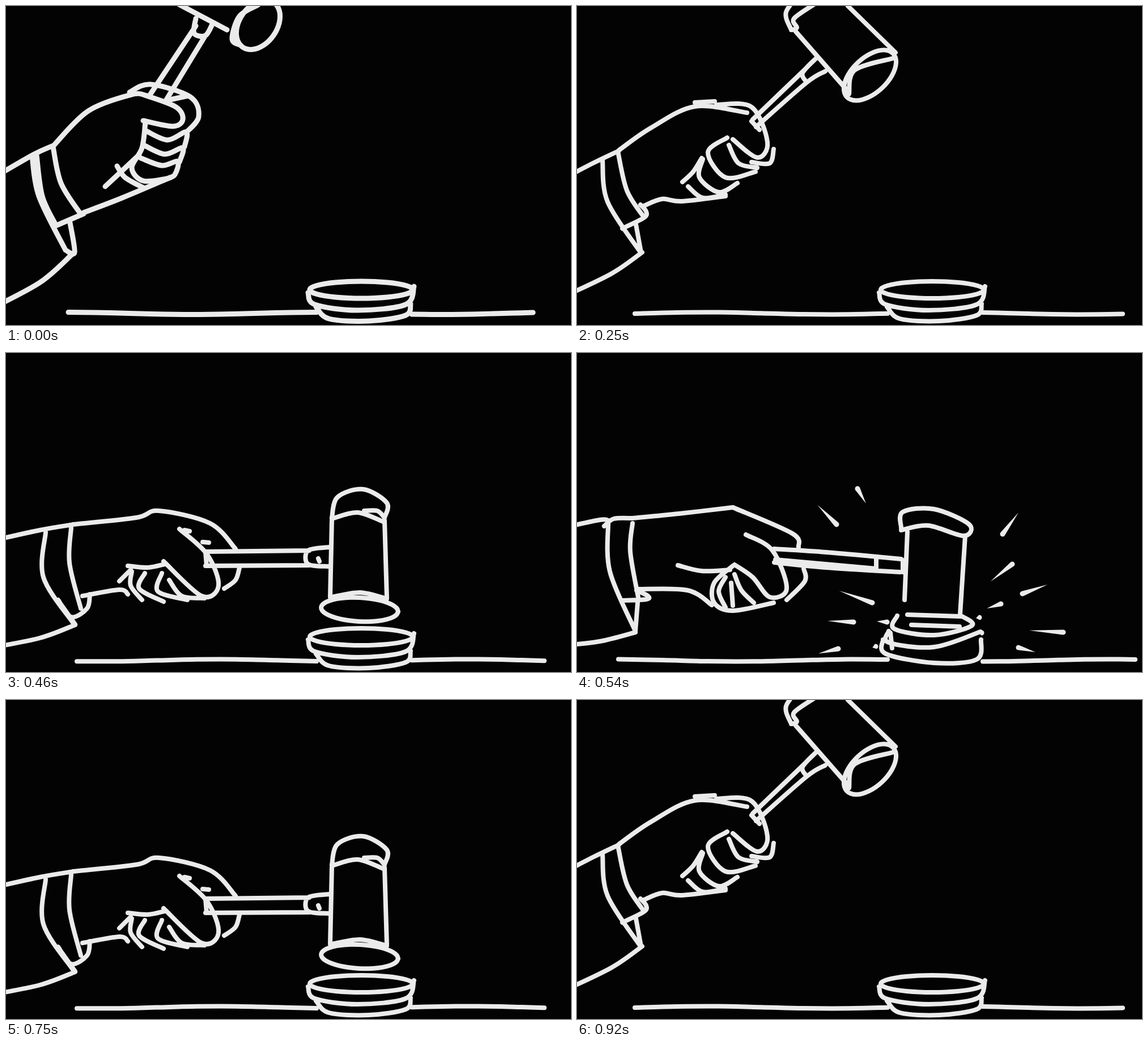
Write an HTML page with a canvas that moves like this. It is 997x562 px and loops after 0.97 s.

```html
<!DOCTYPE html>
<html>
<head>
<meta charset="utf-8">
<title>Gavel</title>
<style>
html, body { margin: 0; width: 100%; height: 100%; overflow: hidden; background: #030303; }
canvas { display: block; }
</style>
</head>
<body>
<canvas id="stage" width="997" height="562"></canvas>
<script>
const ctx = document.getElementById('stage').getContext('2d');
const LOOP = 970, PAPER = '#030303', INK = '#ebebeb', IMPACT = [632, 480];

// Strokes are "x y x y ..." split by "/"; "o" is an ellipse: centre, radii, turn in degrees.
const idleBlock = 'o 627 500 91 15 0/533 505 545 526 620 536 705 526 720 494/547 530 570 551 640 555 705 545 714 525';

// anchors: cuff and ferrule; ground: both ends of the table line.
const raised = {
  anchors: [100, 320, 343, 45], pen: 9, ground: [110, 930], block: idleBlock,
  arm: `-30 307 48 262 83 246/46 264 58 335 105 430/54 263 64 335 88 386/83 248 97 312 132 367/88 387 137 366
    /113 382 121 434 105 430/117 437 60 487 -30 535/83 247 145 185 222 156 248 158/137 364 205 338 290 302`,
  fist: `248 158 300 178 312 200 294 212 242 202/218 152 255 138 325 160 340 195 318 223/285 166 322 158
    /246 204 240 250 222 285 242 308 285 304/247 220 285 236 318 222 315 248/243 245 280 261 312 250 306 275
    /238 268 275 281 303 274 298 297 285 304/175 318 203 292 235 262/196 282 210 302 242 320`,
  gavel: `253 158 335 35/283 165 350 55/335 22 332 48 352 52 365 30/305 -3 390 42/o 445 33 48 33 -55/414 69 399 58 412 18 445 -2`
};
const falling = {
  anchors: [95, 325, 410, 115], pen: 8, ground: [102, 963], block: idleBlock,
  arm: `-30 307 30 276 74 255/45 272 54 345 112 434/72 256 88 325 118 372/80 392 118 373 122 362 112 350/104 385 113 434
    /115 434 60 472 -30 515/74 254 130 215 208 177 300 188/118 352 150 340 185 344 262 335`,
  fist: `208 170 243 168/246 174 308 178 336 240 318 267 275 235/347 252 340 277 308 275/268 245 285 277 318 285
    /265 232 231 258 262 302 315 292/222 270 216 302 250 328 283 312/196 318 222 338 262 332/186 310 205 292 220 268`,
  gavel: `310 200 402 112/316 213 405 135 438 115/308 203 322 218/422 92 398 118 405 134/386 45 478 150/478 0 562 82
    /o 517 122 56 31 -43/480 155 490 113 558 92/378 42 370 8 415 -30 478 -12/380 42 388 38 383 22 420 -4`
};
const swinging = {
  anchors: [130, 345, 515, 205], pen: 9, ground: [105, 950], block: idleBlock,
  arm: `-30 320 50 298 138 271/97 285 90 365 150 465/130 273 126 340 160 394/115 413 170 392/130 412 152 424/157 400 150 465
    /120 415 150 460/152 465 45 508 -30 525/143 269 200 254 300 227 400 248/170 390 188 380 240 377`,
  fist: `415 278 433 335 420 355 390 367/310 278 355 307 383 365 360 378 318 342/318 340 250 330/250 335 265 346
    /243 365 262 394 298 402/275 365 278 383 298 400/300 352 303 372 350 390/298 402 345 390 375 392 395 370/375 330 390 322 392 312`,
  gavel: `335 290 500 200/355 303 535 215/335 290 355 305/525 180 500 192 510 218 535 216/522 118 528 180 552 248
    /610 97 630 150 646 230/522 125 555 98 615 98/518 115 500 85 550 50 603 65 604 92/520 112 525 88 565 77 600 92
    /550 225 600 205 645 212/556 240 600 220 645 226/o 612 270 56 33 -15/585 275 610 285 640 277/585 262 607 249`
};
const struck = {
  anchors: [95, 370, 540, 370], pen: 8, ground: [73, 985],
  arm: `-30 309 40 294 55 295/48 305 65 292 98 291/55 300 58 385 103 490/98 300 94 350 108 430/78 436 122 434 125 428 105 418
    /107 440 103 490/103 492 40 508 -30 516/98 291 180 283 275 272/275 272 380 318 391 342/108 416 195 418 238 444`,
  fist: `178 374 220 384 270 382/298 320 345 348 370 415 340 430 310 395 278 373/275 375 242 405 242 440 275 454 347 440
    /262 395 250 420 262 448/272 405 275 445/278 390 290 418 312 440/400 380 402 402 370 435`,
  gavel: `348 345 440 351 572 363/348 369 440 378 570 386/350 364 528 380/528 360 528 378/575 365 575 386
    /583 315 578 435/685 322 676 460/572 308 575 280 630 275 692 302 682 322 620 304 572 312/583 461 676 464
    /565 463 560 486 630 497 697 480 676 462/590 479 675 482`,
  block: '550 490 550 510 630 518 712 491/540 505 545 530 630 546 705 540 713 505/553 493 556 520'
};
const resting = {
  anchors: [95, 370, 545, 370], pen: 8, ground: [60, 988],
  arm: `-30 300 0 294 48 288/48 291 75 292 115 285/52 292 55 390 100 497/88 293 90 370 107 448/65 458 118 448 126 437 112 424
    /112 460 117 480 95 497/105 498 60 508 -30 524/112 285 278 272/285 274 378 312 393 335/108 418 165 424 240 452 340 448`,
  fist: `173 380 210 383 240 377/222 360 260 374 308 383/300 308 355 348 378 415 345 430 310 383/228 398 206 408 228 443
    /255 390 238 410 252 448/295 390 275 410 300 452/318 410 330 435 375 440 403 410 400 380`,
  gavel: `357 347 440 350 535 358/357 368 440 375 535 382/587 359 540 362 540 392 587 397/600 318 588 485/698 330 690 487
    /o 647 298 72 25 9/600 305 650 302 695 318/575 480 567 500 620 517 708 506 695 483/575 480 640 490 690 485`,
  block: '555 505 550 530 640 550 724 535 705 514/555 510 640 533 722 520'
};
const lifted = {
  anchors: [110, 380, 550, 360], pen: 8, ground: [125, 950], block: idleBlock,
  arm: `-30 332 60 312 120 302/70 316 66 395 118 475/115 308 112 370 132 450/92 435 115 465 143 450 148 425/95 440 122 478
    /122 479 60 502 -30 520/118 302 230 290 270 278 360 300 405 345/135 428 200 417 215 425`,
  fist: `200 402 220 382/215 375 250 378 280 372/306 310 355 355 375 410 345 428 278 367/222 385 220 410 240 435
    /245 388 235 415 278 438/275 388 268 420 320 435/288 400 310 428 350 432/412 378 405 400 385 415/315 312 324 314/347 333 358 334`,
  gavel: `352 350 535 348/352 375 535 374/352 350 354 375/570 342 533 348 533 372 570 376/551 362 553 367/575 295 572 430
    /668 295 672 430/575 290 585 254 630 240 672 264 668 290/575 292 620 281 665 297/632 278 655 278 668 290
    /o 624 452 68 21 3/575 430 625 422 672 433`
};

// Sparks lie on rays from the impact: round end, then distance outward to the pointed tip.
const sparks = `458 302 48/495 239 -30/751 319 47/768 372 -49/786 424 47/521 440 62/488 474 46/858 492 -60
  /461 521 36/779 519 31/748 442 -26/547 474 18/710 466 -6/527 517 6/714 493 -5`;
// Streaks: pointed tip, then round end.
const streaks = `516 208 541 236/463 279 498 299/844 323 813 326/425 454 459 450/326 495 354 487
  /592 122 615 183/679 154 678 68/780 247 838 205`;
// Cusps of the dust clouds, clockwise; every pair is joined by a puff.
const dust = `316 225 350 205 376 233 360 264 322 252 316 225/430 198 438 153 458 86 515 57/510 148 430 200/512 102 482 112
  /551 55 600 62 590 100 527 136/676 52 690 20 708 10 735 20 700 49 676 52/760 143 768 94 820 96/800 220 795 154 820 117
  /848 102 877 136 922 237/932 245 940 302 915 340 864 300/929 345 893 345/888 468 942 415/948 445 920 470 888 468
  /990 408 985 383 996 352`;

// [step, pose, optional anchors]
const keys = [
  [0, raised], [2.5, raised, [98, 318, 318, 30]], [5, raised], [6, falling], [9, swinging], [11, lifted],
  [13, struck], [14, struck], [15, resting], [17, resting], [18, lifted], [20, swinging], [22, falling]
];

const same = p => p;
const spread = k => ([x, y]) => [IMPACT[0] + (x - IMPACT[0]) * k, IMPACT[1] + (y - IMPACT[1]) * k];
const numbers = text => text.split('/').map(line => line.match(/-?\d+/g).map(Number));
const pairs = n => n.flatMap((x, i) => i % 2 ? [] : [[x, n[i + 1]]]);

function ellipse([cx, cy, rx, ry, turn]) {
  const c = Math.cos(turn * Math.PI / 180), s = Math.sin(turn * Math.PI / 180);
  return Array.from({ length: 25 }, (_, i) => {
    const u = rx * Math.cos(i * Math.PI / 12), v = ry * Math.sin(i * Math.PI / 12);
    return [cx + u * c - v * s, cy + u * s + v * c];
  });
}

// Smooth pen line through the points (Catmull-Rom).
function trace(p) {
  ctx.moveTo(...p[0]);
  for (let i = 0; i < p.length - 1; i++) {
    const a = p[i - 1] || p[i], b = p[i], c = p[i + 1], d = p[i + 2] || c;
    ctx.bezierCurveTo(b[0] + (c[0] - a[0]) / 6, b[1] + (c[1] - a[1]) / 6,
      c[0] - (d[0] - b[0]) / 6, c[1] - (d[1] - b[1]) / 6, ...c);
  }
}

function draw(text, move = same) {
  ctx.beginPath();
  for (const line of text.split('/')) {
    const [n] = numbers(line);
    trace((line.trim()[0] === 'o' ? ellipse(n) : pairs(n)).map(move));
  }
  ctx.stroke();
}

function drawGround([left, right]) {
  ctx.beginPath();
  for (const [from, to] of [[left, 548], [716, right]]) {
    const points = [];
    for (let i = 0; i <= 6; i++) {
      const x = from + (to - from) * i / 6;
      points.push([x, 541.5 + 2 * Math.sin(x / 70 + left)]);
    }
    trace(points);
  }
  ctx.stroke();
}

function taper([x, y], [u, v]) {
  const angle = Math.atan2(v - y, u - x);
  ctx.beginPath();
  ctx.moveTo(x, y);
  ctx.arc(u, v, 4.5, angle - Math.PI / 2, angle + Math.PI / 2);
  ctx.fill();
}

function drawSparks(move) {
  for (const [x, y, length] of numbers(sparks)) {
    const tip = spread(1 + length / Math.hypot(x - IMPACT[0], y - IMPACT[1]))([x, y]);
    taper(move(tip), move([x, y]));
  }
}

function drawDust(move) {
  ctx.beginPath();
  for (const line of numbers(dust)) {
    const p = pairs(line).map(move);
    for (let i = 1; i < p.length; i++) {
      const [x, y] = p[i - 1], [u, v] = p[i], r = Math.hypot(u - x, v - y) * 0.56;
      const half = Math.asin(0.5 / 0.56), out = Math.atan2(v - y, u - x) - Math.PI / 2;
      const cx = (x + u) / 2 - Math.cos(out) * r * Math.cos(half);
      const cy = (y + v) / 2 - Math.sin(out) * r * Math.cos(half);
      ctx.moveTo(x, y);
      ctx.arc(cx, cy, r, out - half, out + half);
    }
  }
  ctx.stroke();
  for (const line of numbers(streaks)) taper(...pairs(line).map(move));
}

// Turn and scale so that the anchors of a pose land on the given ones.
function carry([ax, ay, bx, by], [cx, cy, dx, dy]) {
  const px = bx - ax, py = by - ay, qx = dx - cx, qy = dy - cy, size = px * px + py * py;
  const re = (qx * px + qy * py) / size, im = (qy * px - qx * py) / size;
  return ([x, y]) => [cx + (x - ax) * re - (y - ay) * im, cy + (x - ax) * im + (y - ay) * re];
}

function render(step) {
  const next = Math.max(1, keys.findIndex(k => k[0] >= step));
  const from = keys[next - 1], to = keys[next];
  const mix = (step - from[0]) / (to[0] - from[0]);
  const pose = (mix < 0.5 ? from : to)[1];
  const start = from[2] || from[1].anchors, end = to[2] || to[1].anchors;
  const move = carry(pose.anchors, start.map((v, i) => v + (end[i] - v) * mix));

  ctx.fillStyle = PAPER;
  ctx.fillRect(0, 0, 997, 562);
  ctx.fillStyle = ctx.strokeStyle = INK;
  ctx.lineCap = ctx.lineJoin = 'round';
  ctx.lineWidth = pose.pen;
  drawGround(pose.ground);
  draw(pose.block);
  for (const part of [pose.arm, pose.fist, pose.gavel]) draw(part, move);

  if (step >= 12 && step <= 14) drawSparks(spread(1 + (step - 13) * 0.3));
  if (step >= 15 && step <= 17) drawDust(spread(1 + (step - 16) * 0.1));
}

function tick() {
  const time = performance.now() % LOOP;
  render(Math.min(22, Math.floor((time + 6) * 0.024))); // 24 drawings a second
  requestAnimationFrame(tick);
}
tick();
</script>
</body>
</html>
```
